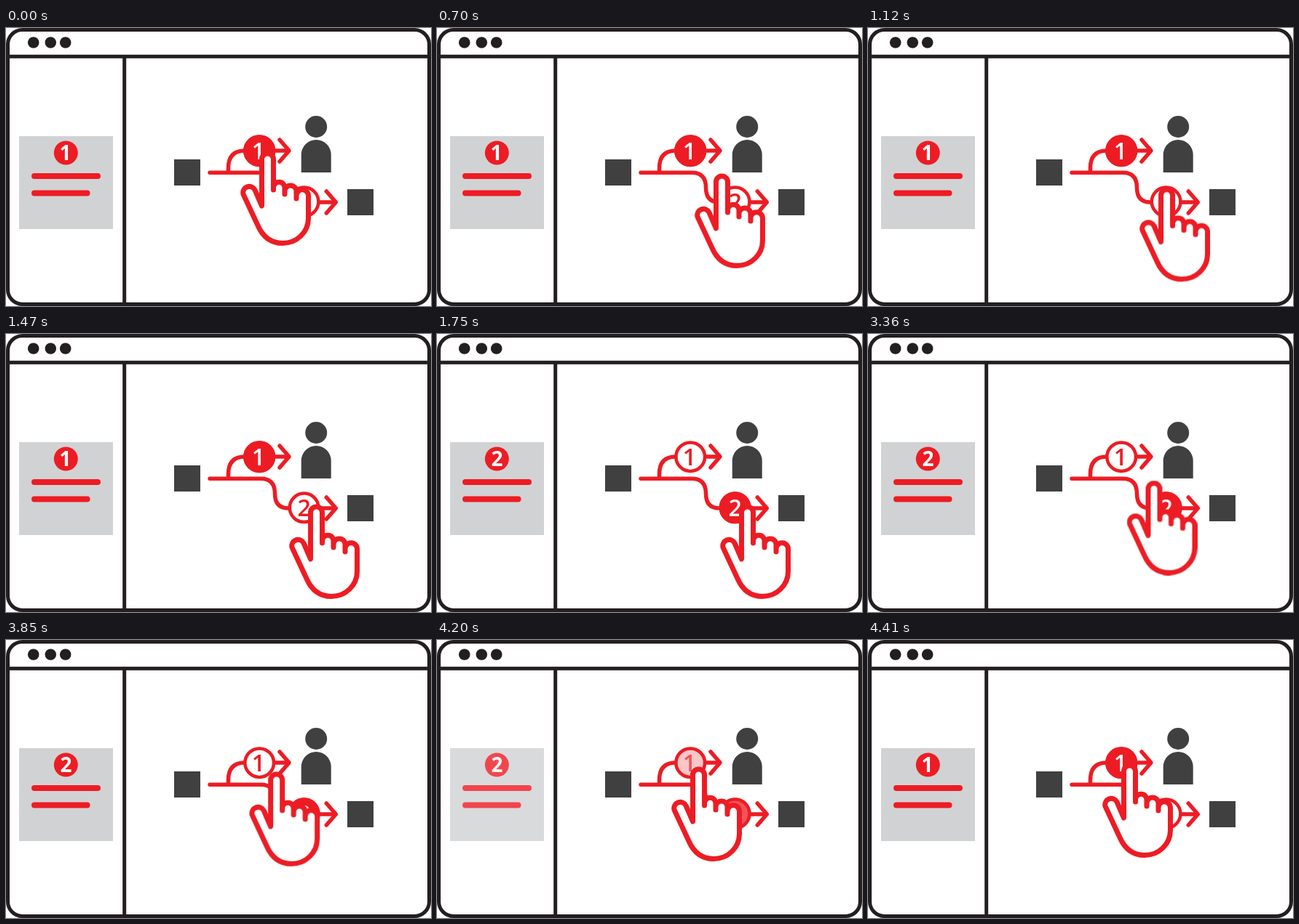
These frames come from a looping animation (584x383 px, 5.25 s). An HTML page:

```html
<!DOCTYPE html>
<html lang="en">
<head>
<meta charset="utf-8">
<title>Switching between steps</title>
<style>
  html, body { margin: 0; width: 100%; height: 100%; overflow: hidden; background: #fff; }
  svg { display: block; width: 584px; height: 383px; }
  text { font: 600 32px "Open Sans", "Noto Sans", sans-serif; text-anchor: middle; }
  .small { font-size: 28px; font-weight: 700; }
  .ink { fill: #231f20; }
  .dark { fill: #404041; }
  .red { fill: #ed1c24; }
  .white { fill: #fff; }
  .frame { fill: none; stroke: #231f20; stroke-width: 5; }
  .line { fill: none; stroke: #ed1c24; stroke-width: 5.5; stroke-linecap: round; stroke-linejoin: round; }
  .bar { stroke-width: 8; }
  .ring { fill: #fff; stroke: #ed1c24; stroke-width: 4.5; }
  .hand { fill: #fff; stroke: #ed1c24; stroke-width: 7; stroke-linejoin: round; }

  /* One tick is 70 ms; the small negative delay keeps ticks off rounding edges. */
  .hand, .first, .second { animation: 5250ms -4ms infinite; }
  .hand { animation-name: tap; }
  .first { animation-name: first; }
  .second { animation-name: second; }

  @keyframes tap {
    0% { transform: translate(0, 0); animation-timing-function: steps(21); }
    28% { transform: translate(67px, 65px); animation-timing-function: steps(2); }
    30.6667% { transform: translate(67px, 75px); animation-timing-function: steps(2); }
    33.3333% { transform: translate(67px, 65px); }
    49.3333% { transform: translate(67px, 65px); animation-timing-function: steps(22); }
    78.6667% { transform: translate(0, 0); animation-timing-function: steps(2); }
    81.3333% { transform: translate(0, 10px); animation-timing-function: steps(2); }
    84%, 100% { transform: translate(0, 0); }
  }
  @keyframes first {
    0%, 28% { opacity: 1; animation-timing-function: steps(4); }
    33.3333%, 78.6667% { opacity: 0; animation-timing-function: steps(4); }
    84%, 100% { opacity: 1; }
  }
  @keyframes second {
    0%, 28% { opacity: 0; animation-timing-function: steps(4); }
    33.3333%, 78.6667% { opacity: 1; animation-timing-function: steps(4); }
    84%, 100% { opacity: 0; }
  }
</style>
</head>
<body>
<svg viewBox="0 0 584 383">
  <defs>
    <g id="panel">
      <path fill="#d1d2d4" d="M18 149h129v128H18z"/>
      <circle class="red" cx="82.3" cy="172" r="16.5"/>
      <path class="line bar" d="M39 204H126M39 227.5H111.5"/>
    </g>
    <path id="arrowhead" class="line" d="M-13-15L0 0L-13 15"/>
  </defs>

  <!-- window -->
  <rect class="frame" x="2.5" y="2.5" width="579" height="378" rx="20"/>
  <path class="frame" d="M3 39.3H581M162.7 39V381"/>
  <g class="ink">
    <circle cx="37.7" cy="20" r="7.8"/>
    <circle cx="61.3" cy="20" r="7.8"/>
    <circle cx="81.7" cy="20" r="7.8"/>
  </g>

  <!-- side panel -->
  <g class="first"><use href="#panel"/><text class="small white" x="81.5" y="182">1</text></g>
  <g class="second"><use href="#panel"/><text class="small white" x="82.5" y="182">2</text></g>

  <!-- diagram -->
  <g class="dark">
    <path d="M231 181h36v36h-36zM469 222h36v36h-36z"/>
    <circle cx="426.2" cy="136" r="15"/>
    <path d="M405.7 199V174.5a20.5 20.5 0 0 1 41 0V199z"/>
  </g>
  <path class="line" d="M280 199.3H350Q369.5 199.3 369.5 220Q369.5 240 388 240M305.5 198V193Q305.5 169 328 169M368 169H387M430 240H452"/>
  <use href="#arrowhead" x="389" y="169"/>
  <use href="#arrowhead" x="453.3" y="240"/>

  <!-- step badges -->
  <circle class="ring" cx="348.2" cy="169.2" r="19.8"/>
  <text class="red" x="347" y="181">1</text>
  <g class="first">
    <circle class="red" cx="348.2" cy="169.2" r="22"/>
    <text class="white" x="347" y="181">1</text>
  </g>
  <circle class="ring" cx="409.6" cy="239.3" r="19.8"/>
  <text class="red" x="409.7" y="250.5">2</text>
  <g class="second">
    <circle class="red" cx="409.6" cy="239.3" r="22"/>
    <text class="white" x="409.7" y="250.5">2</text>
  </g>

  <path class="hand" d="M351.5 245V181a8 8 0 0 1 16 0V223V220a7.75 7.75 0 0 1 15.5 0V229V225a8 8 0 0 1 16 0V235V231a8.25 8.25 0 0 1 16.5 0V262C415.5 281 400 296.5 380 296.5C365 296.5 353 288 346 272L326 229A8.6 8.6 0 0 1 342 223Z"/>
</svg>
</body>
</html>
```
